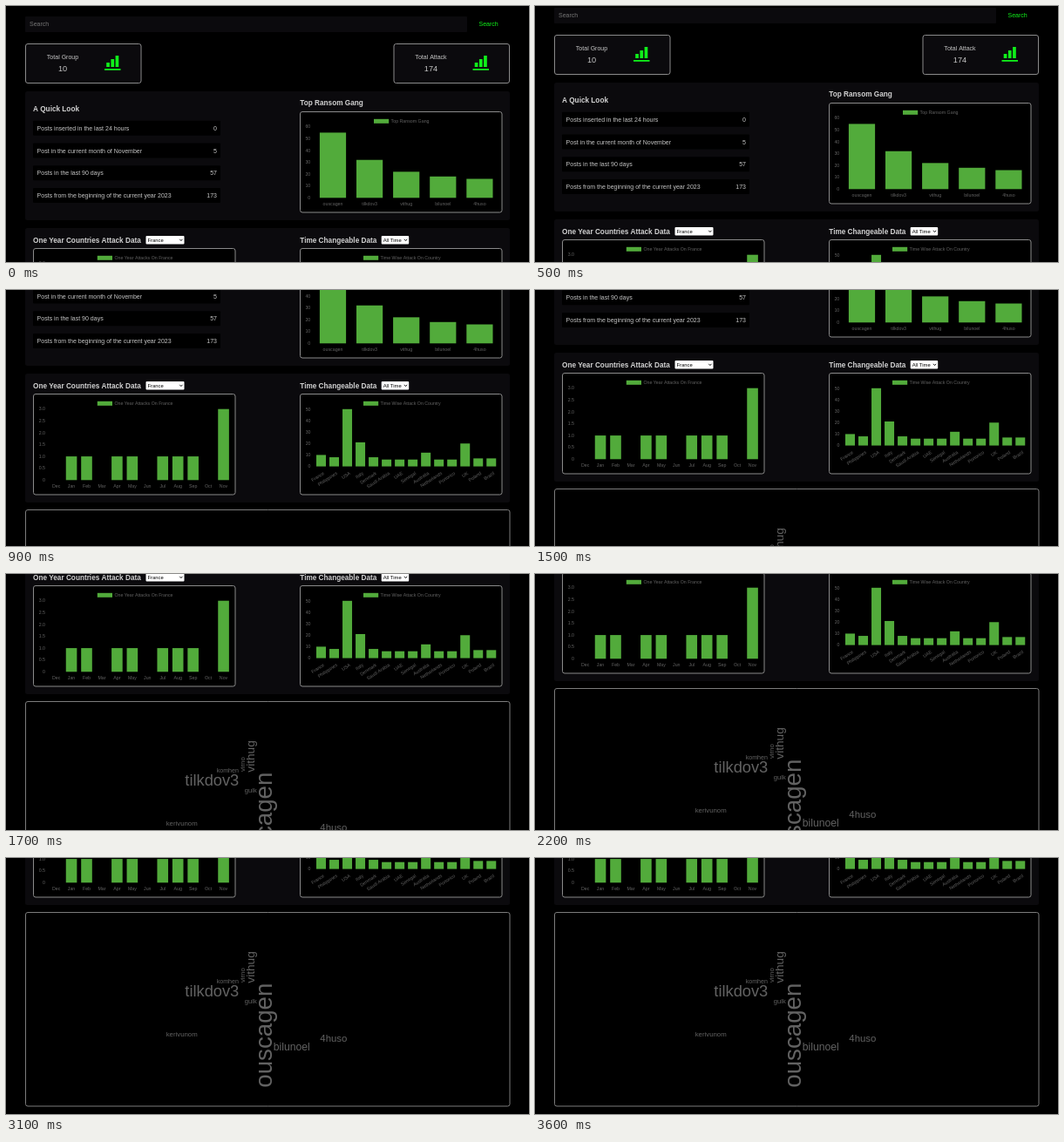
Write an HTML page with a canvas that moves like this. It is 600 px wide and 294 px high and loops after 3.8 s.

```html
<!DOCTYPE html>
<html lang="en">
<head>
<meta charset="utf-8">
<title>Dashboard scroll</title>
<style>
  html, body { margin: 0; width: 100%; height: 100%; overflow: hidden; background: #000; }
  canvas { display: block; width: 600px; height: 294px; }
</style>
</head>
<body>
<canvas id="stage" width="600" height="294"></canvas>
<script>
const ctx = document.getElementById('stage').getContext('2d');
const FONT = '"Liberation Sans", Arial, sans-serif';
const LOOP = 3800;
const PANEL = '#0b0a0d', LINE = '#8a8a8a', BAR = '#52ab3b', LIME = '#10f01a';
const TEXT = '#c6c6c6', DIM = '#626262';

// Wheel scrolling, sampled every 100 ms: [start time, offsets...]
const bursts = [
  [500, 10, 42, 80, 128, 159, 159],
  [1500, 183, 235, 265],
  [2200, 280, 318, 343, 349]
];

function scrollAt(t) {
  let y = 0;
  for (const [start, ...steps] of bursts) {
    if (t < start) break;
    y = steps[Math.min(steps.length - 1, Math.floor((t - start) / 100))];
  }
  return y;
}

function rect(x, y, w, h, fill) {
  ctx.fillStyle = fill;
  ctx.fillRect(x, y, w, h);
}

function box(x, y, w, h, fill, stroke, r = 2.5) {
  ctx.beginPath();
  ctx.roundRect(x, y, w, h, r);
  ctx.fillStyle = fill;
  ctx.fill();
  if (stroke) {
    ctx.strokeStyle = stroke;
    ctx.lineWidth = 1;
    ctx.stroke();
  }
}

function text(str, x, y, { size = 7.03, color = TEXT, align = 'left', bold = false, angle = 0 } = {}) {
  ctx.save();
  ctx.translate(x, y);
  ctx.rotate(angle * Math.PI / 180);
  ctx.font = `${bold ? 'bold ' : ''}${size}px ${FONT}`;
  ctx.textAlign = align;
  ctx.fillStyle = color;
  ctx.fillText(str, 0, 0);
  ctx.restore();
}

const heading = (str, x, y) => text(str, x, y, { size: 8.22, bold: true, color: '#d2d2d2' });
const small = (str, x, y, align, angle) => text(str, x, y, { size: 5.27, color: DIM, align, angle });

function card(x, label, value) {
  box(x + 0.5, 43.5, 132.5, 45, PANEL, LINE);
  text(label, x + 43, 61, { align: 'center' });
  text(value, x + 43, 75.3, { size: 9.2, align: 'center' });
  [5, 9, 13].forEach((h, i) => rect(x + 93.2 + i * 5.2, 70 - h, 3.7, h, LIME));
  rect(x + 91, 72, 18.5, 1.8, LIME);
}

function select(x, w, label) {
  box(x, 264, w, 9.5, '#fff', null, 1);
  text(label, x + 2, 271, { size: 5.87, color: '#000' });
  ctx.beginPath();
  ctx.moveTo(x + w - 5.2, 267.8);
  ctx.lineTo(x + w - 3.6, 269.6);
  ctx.lineTo(x + w - 2, 267.8);
  ctx.strokeStyle = '#000';
  ctx.lineWidth = 0.9;
  ctx.stroke();
}

function chart(c) {
  box(c.x + 0.5, c.y + 0.5, 231.5, 115.5, '#000', LINE);
  rect(c.legendX, c.y + 8.8, 17.2, 5, BAR);
  small(c.title, c.legendX + 19.6, c.y + 13.2);
  c.ticks.forEach((tick, i) => {
    const y = c.zero - c.height * i / (c.ticks.length - 1);
    small(tick, c.axisX, y + 1.7, 'right');
  });
  c.values.forEach((v, i) => {
    const x = c.first + i * c.step, h = v / c.max * c.height;
    rect(x - c.width / 2, c.zero - h, c.width, h, BAR);
    if (c.angle) small(c.labels[i], x + 4, c.zero + 8.8, 'right', c.angle);
    else small(c.labels[i], x, c.zero + 8.6, 'center');
  });
}

const gangs = {
  x: 337, y: 121, title: 'Top Ransom Gang', legendX: 422, axisX: 349.3,
  zero: 220.3, height: 81.7, max: 60, first: 375, step: 42.1, width: 30.2,
  ticks: ['0', '10', '20', '30', '40', '50', '60'],
  values: [55, 32, 22, 18, 16],
  labels: ['ouscagen', 'tilkdov3', 'vithug', 'bilunoel', '4huso']
};

const months = {
  x: 31, y: 278, title: 'One Year Attacks On France', legendX: 104.8, axisX: 45,
  zero: 377.3, height: 81.6, max: 3, first: 57.6, step: 17.45, width: 12.6,
  ticks: ['0', '0.5', '1.0', '1.5', '2.0', '2.5', '3.0'],
  values: [0, 1, 1, 0, 1, 1, 0, 1, 1, 1, 0, 3],
  labels: 'Dec Jan Feb Mar Apr May Jun Jul Aug Sep Oct Nov'.split(' ')
};

const countries = {
  x: 337, y: 278, title: 'Time Wise Attack On Country', legendX: 410, axisX: 349.5,
  zero: 361.6, height: 65.8, max: 50, first: 361.5, step: 15.02, width: 11,
  angle: -33,
  ticks: ['0', '10', '20', '30', '40', '50'],
  values: [10, 8, 50, 21, 8, 6, 6, 6, 12, 6, 6, 20, 7, 7],
  labels: ['France', 'Philippines', 'USA', 'Italy', 'Denmark', 'Saudi Arabia', 'UAE',
    'Senegal', 'Australia', 'Netherlands', 'Portorico', 'UK', 'Poland', 'Brazil']
};

const posts = [
  ['Posts inserted in the last 24 hours', '0'],
  ['Post in the current month of November', '5'],
  ['Posts in the last 90 days', '57'],
  ['Posts from the beginning of the current year 2023', '173']
];

// word, x, baseline y, size, angle
const cloud = [
  ['ouscagen', 305.2, 612.7, 27.7, -90],
  ['vithug', 285, 492.7, 13.7, -90],
  ['virno', 273.8, 492, 7.7, -90],
  ['tilkdov3', 205.3, 508.4, 18.3, 0],
  ['komhen', 241.7, 493, 7.1, 0],
  ['gulk', 273.8, 516.2, 7.6, 0],
  ['kerivunom', 183.7, 554.2, 7.8, 0],
  ['bilunoel', 306.7, 570.3, 12.2, 0],
  ['4huso', 360.3, 559.5, 11.4, 0]
];

function drawPage() {
  box(22, 12, 507, 18, PANEL, null, 1);
  text('Search', 27, 23.4, { color: '#757575' });
  text('Search', 542.5, 23.2, { color: LIME });
  card(22, 'Total Group', '10');
  card(444.5, 'Total Attack', '174');

  box(22, 98, 556, 148, PANEL);
  heading('A Quick Look', 31, 121);
  posts.forEach(([label, count], i) => {
    const y = 131.7 + i * 25.8;
    box(31, y, 215, 17, '#000', null, 1);
    text(label, 35.6, y + 11);
    text(count, 242, y + 11, { align: 'right' });
  });
  heading('Top Ransom Gang', 337.3, 114.3);
  chart(gangs);

  box(22, 255, 556, 148, PANEL);
  heading('One Year Countries Attack Data', 31, 271.5);
  select(160.5, 44, 'France');
  heading('Time Changeable Data', 337.3, 271.5);
  select(430.7, 31.5, 'All Time');
  chart(months);
  chart(countries);

  box(22.5, 411.5, 555.5, 222.5, '#000', '#7c7c7c');
  for (const [word, x, y, size, angle] of cloud) text(word, x, y, { size, angle, color: DIM });
}

const began = performance.now();

function frame() {
  const t = (performance.now() - began) % LOOP;
  rect(0, 0, 600, 294, '#000');
  ctx.save();
  ctx.translate(0, -scrollAt(t));
  drawPage();
  ctx.restore();
  requestAnimationFrame(frame);
}
frame();
</script>
</body>
</html>
```
